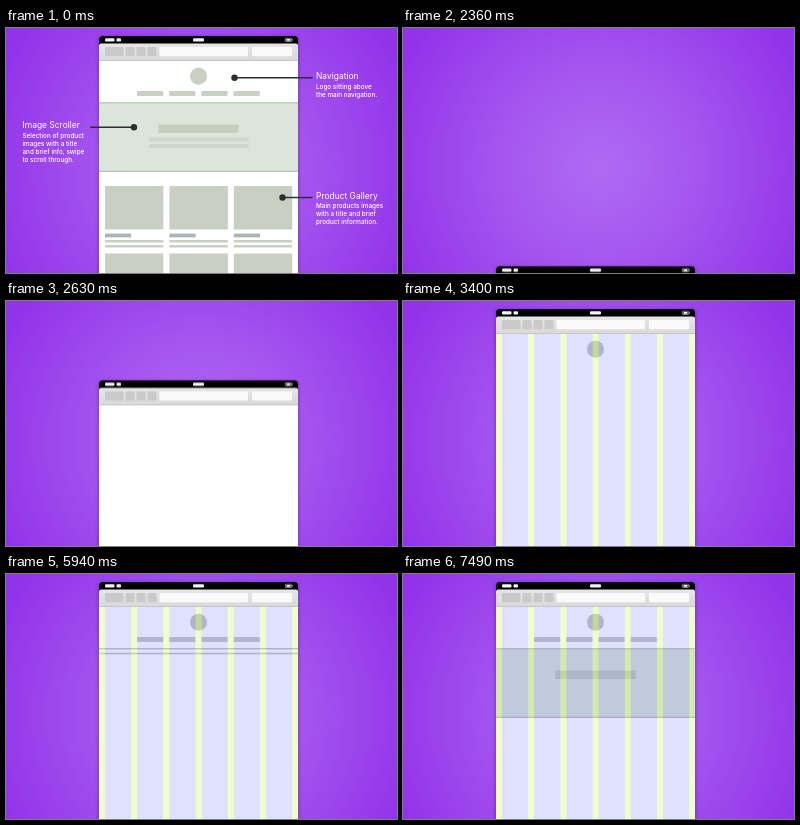
Write an HTML page that moves like this. It is 391x245 px and loops after 8000 ms.

```html
<!DOCTYPE html>
<html lang="en">
<head>
<meta charset="utf-8">
<title>Wireframe build</title>
<style>
  html, body { margin: 0; width: 100%; height: 100%; overflow: hidden; background: #9333ea; }
  svg { display: block; width: 100vw; height: 100vh; }
  text { font: 500 6.35px Inter, Lato, sans-serif; fill: #fff; }
  text.head { font-size: 8.45px; font-weight: 400; }
  .sheet { filter: drop-shadow(0 1px 2px rgba(30, 0, 60, .4)); }
  .block { fill: #c9cfc2; }
  .nav { fill: #c9d0c6; }
  .rule { fill: #b4bdb3; }
  .hero { fill: #dce5da; }
  .title { fill: #c5cec1; }
  .copy { fill: #ced7cb; }
  .call { stroke: #2d2d33; stroke-width: 1.4; fill: #2d2d33; }

  /* every track shares the same 8 s loop */
  .a { animation: 8s linear infinite both; }
  #board { animation-name: board; }
  #page { animation-name: page; }
  #guides { animation-name: guides; }
  #logo { animation-name: logo; transform-origin: 192.5px 48.3px; }
  #tab { animation-name: tab; transform-origin: 131px 0; }
  #drag { animation-name: drag; }
  #tab2 { animation-name: tab2; }
  #tab3 { animation-name: tab3; }
  #top { animation-name: top; transform-origin: 93px 0; }
  #bottom { animation-name: bottom; }
  #fill { animation-name: fill; }
  #title { animation-name: title; }

  @keyframes board {
    0%, 11.25% { opacity: 1; }
    18.375%, 100% { opacity: 0; }
  }
  @keyframes page {
    0%, 29.12% { transform: translateY(255px); }
    29.125% { transform: translateY(237px); animation-timing-function: cubic-bezier(.32, .15, .33, 1); }
    37.375%, 100% { transform: none; }
  }
  @keyframes guides {
    0%, 33.6% { opacity: 0; }
    37.3%, 100% { opacity: 1; }
  }
  @keyframes logo {
    0%, 40.25% { transform: scale(0); animation-timing-function: ease-out; }
    42.5%, 100% { transform: scale(1); }
  }
  @keyframes tab {
    0%, 45% { transform: scaleX(0); }
    46.875%, 100% { transform: scaleX(1); }
  }
  @keyframes drag {
    0%, 50.24% { transform: none; opacity: 0; }
    50.25% { transform: none; opacity: 1; }
    60.75%, 100% { transform: translateX(96.6px); opacity: 1; }
  }
  @keyframes tab2 {
    0%, 53.74% { opacity: 0; }
    53.75%, 100% { opacity: 1; }
  }
  @keyframes tab3 {
    0%, 57.24% { opacity: 0; }
    57.25%, 100% { opacity: 1; }
  }
  @keyframes top {
    0%, 67.875% { transform: scaleX(0); }
    70.125%, 100% { transform: scaleX(1); }
  }
  @keyframes bottom {
    0%, 73.87% { transform: translateY(-68.5px); opacity: 0; }
    73.875% { transform: translateY(-68.5px); opacity: 1; }
    79.5%, 100% { transform: none; opacity: 1; }
  }
  @keyframes fill {
    0%, 79.5% { opacity: 0; }
    81.375%, 100% { opacity: 1; }
  }
  @keyframes title {
    0%, 92.12% { opacity: 0; }
    92.5%, 93.3% { opacity: .5; }
    93.6%, 100% { opacity: 1; }
  }
</style>
</head>
<body>
<svg viewBox="0 0 391 245" preserveAspectRatio="none">
  <defs>
    <radialGradient id="glow" gradientUnits="userSpaceOnUse" cx="196" cy="139" r="225">
      <stop offset="0" stop-color="#b06af2"/>
      <stop offset=".45" stop-color="#a455ef"/>
      <stop offset="1" stop-color="#9232e9"/>
    </radialGradient>
    <linearGradient id="chrome" x2="0" y2="1">
      <stop offset="0" stop-color="#e6e6e6"/>
      <stop offset="1" stop-color="#d9d9d9"/>
    </linearGradient>
    <pattern id="grid" patternUnits="userSpaceOnUse" x="93" y="0" width="32.2" height="245">
      <path d="M0 0h6v245h-6z" fill="#af0" fill-opacity=".2"/>
      <path d="M6 0h26.2v245h-26.2z" fill="#00f" fill-opacity=".12"/>
    </pattern>

    <g id="browser">
      <path class="sheet" d="M93 260V11q0-3 3-3h193q3 0 3 3v249z" fill="#fff"/>
      <path d="M93 20V11q0-3 3-3h193q3 0 3 3v9z"/>
      <path d="M93 33V17.500q0-2 2-2h195q2 0 2 2V33z" fill="url(#chrome)"/>
      <path d="M93 32h199v1h-199z" fill="#c6c6c6"/>
      <g fill="#f4f4f4">
        <rect x="99" y="10.200" width="9.500" height="3.200" rx="1.200"/>
        <rect x="110.500" y="10.200" width="4.500" height="3.200" rx="1.200"/>
        <rect x="187" y="10.200" width="11" height="3.200" rx="1.200"/>
        <rect x="280.500" y="11" width="4" height="1.800"/>
        <rect x="286.100" y="11.200" width=".6" height="1.300"/>
      </g>
      <rect x="279.300" y="10.200" width="6.400" height="3.300" rx=".7" fill="none" stroke="#ddd" stroke-width=".6"/>
      <g fill="#c9c9c9">
        <rect x="99" y="19" width="18.500" height="9.200" rx="1"/>
        <rect x="119.500" y="19" width="9" height="9.200" rx="1"/>
        <rect x="130.500" y="19" width="9" height="9.200" rx="1"/>
        <rect x="141.500" y="19" width="9" height="9.200" rx="1"/>
      </g>
      <g fill="#fafafa">
        <rect x="153.500" y="19" width="88.500" height="9.200" rx="1"/>
        <rect x="246" y="19" width="40" height="9.200" rx="1"/>
      </g>
    </g>

    <circle id="dot" class="block" cx="192.500" cy="48.300" r="8.500"/>
    <rect id="link" class="nav" x="131" y="63" width="26.200" height="5" rx=".5"/>
    <rect id="line" class="rule" x="93" y="74.200" width="199" height="1.200"/>
    <rect id="band" class="hero" x="93" y="75" width="199" height="68.500"/>
    <rect id="bar" class="title" x="152.500" y="96.500" width="80" height="8.500"/>

    <g id="item">
      <rect class="block" x="99" y="158" width="58.400" height="43.500"/>
      <rect x="99" y="205.600" width="26.200" height="3.800" fill="#adb4b5"/>
      <path class="block" d="M99 212h58.400v2.500h-58.400zM99 217h58.400v2.500h-58.400z"/>
      <rect class="block" x="99" y="225.500" width="58.400" height="30"/>
    </g>
  </defs>

  <rect width="391" height="245" fill="url(#glow)"/>

  <g id="page" class="a">
    <use href="#browser"/>
    <g id="logo" class="a"><use href="#dot"/></g>
    <g id="tab" class="a"><use href="#link"/></g>
    <g id="tab2" class="a"><use href="#link" x="32.200"/></g>
    <g id="tab3" class="a"><use href="#link" x="64.400"/></g>
    <g id="drag" class="a"><use href="#link"/></g>
    <g id="fill" class="a"><use href="#band"/></g>
    <g id="title" class="a"><use href="#bar"/></g>
    <g id="top" class="a"><use href="#line"/></g>
    <g id="bottom" class="a"><use href="#line" y="68.500"/></g>
    <rect id="guides" class="a" x="93" y="33" width="199" height="212" fill="url(#grid)"/>
  </g>

  <g id="board" class="a">
    <use href="#browser"/>
    <use href="#dot"/>
    <use href="#link"/>
    <use href="#link" x="32.200"/>
    <use href="#link" x="64.400"/>
    <use href="#link" x="96.600"/>
    <use href="#band"/>
    <use href="#line"/>
    <use href="#line" y="68.500"/>
    <use href="#bar"/>
    <path class="copy" d="M143 109.500h99.500v4h-99.500zM143 116h99.500v4h-99.500z"/>
    <use href="#item"/>
    <use href="#item" x="64.400"/>
    <use href="#item" x="128.800"/>

    <g class="call">
      <path d="M228.500 49.700H306.500M84 99.300H128M276.500 169.500H306.500"/>
      <g stroke="none">
        <circle cx="228.500" cy="49.700" r="3.200"/>
        <circle cx="128" cy="99.300" r="3.200"/>
        <circle cx="276.500" cy="169.500" r="3.200"/>
      </g>
    </g>

    <text class="head" x="310" y="51">Navigation</text>
    <text y="60.800"><tspan x="310">Logo sitting above</tspan><tspan x="310" dy="7.800">the main navigation.</tspan></text>

    <text class="head" x="16.500" y="100.300">Image Scroller</text>
    <text y="110.200"><tspan x="16.500">Selection of product</tspan><tspan x="16.500" dy="7.800">images with a title</tspan><tspan x="16.500" dy="7.800">and brief info, swipe</tspan><tspan x="16.500" dy="7.800">to scroll through.</tspan></text>

    <text class="head" x="310" y="170.500">Product Gallery</text>
    <text y="180.200"><tspan x="310">Main products images</tspan><tspan x="310" dy="7.800">with a title and brief</tspan><tspan x="310" dy="7.800">product information.</tspan></text>
  </g>
</svg>
</body>
</html>
```
